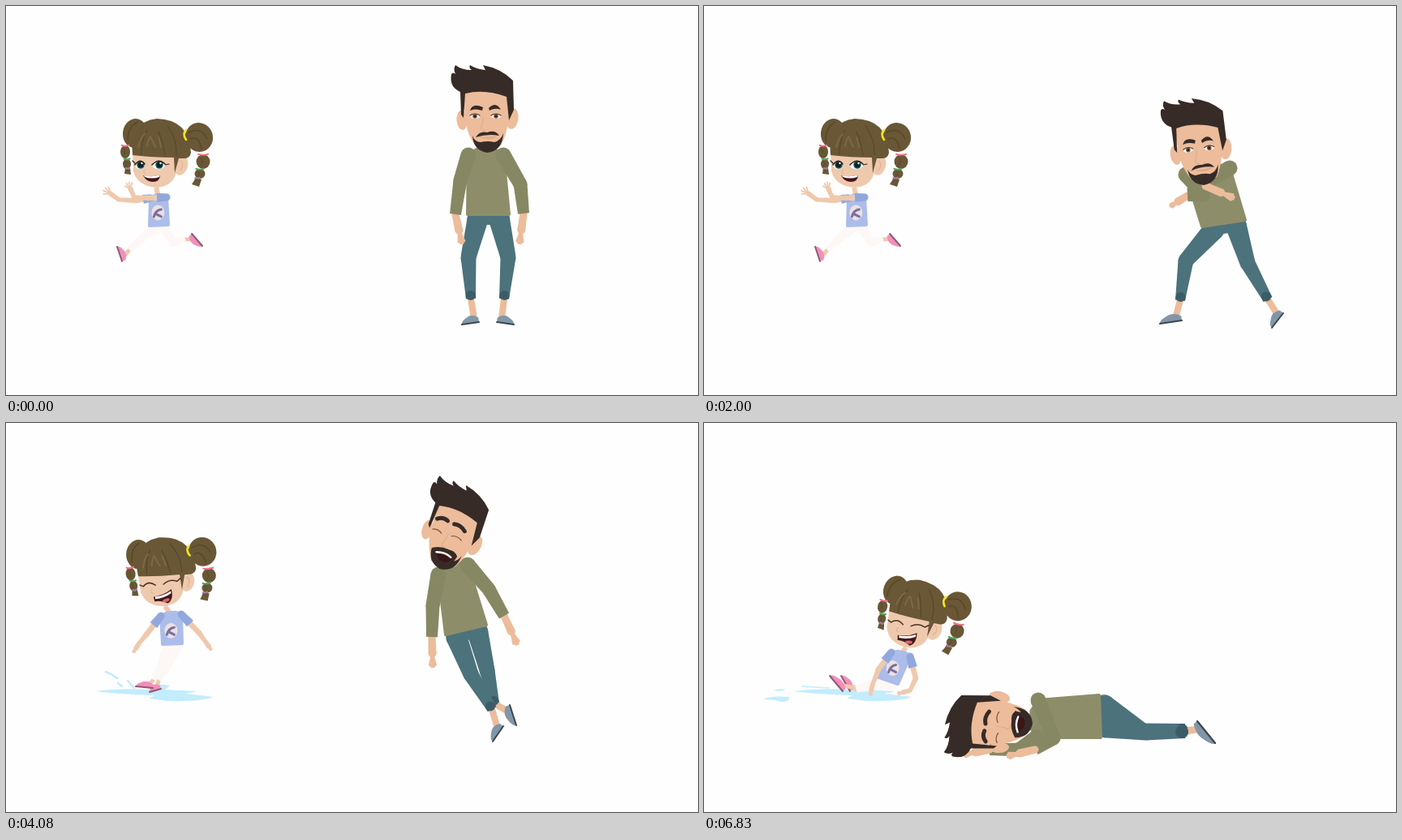
An HTML page with a canvas for the animation above (6.91 s loop, 853 px wide and 480 px high).

```html
<!DOCTYPE html>
<html lang="en">
<head>
<meta charset="utf-8">
<title>Run, dodge, slip</title>
<style>
html, body { margin: 0; width: 100%; height: 100%; overflow: hidden; background: #fefefe; }
canvas { display: block; }
</style>
</head>
<body>
<canvas id="stage" width="853" height="480"></canvas>
<script>
const ctx = document.getElementById('stage').getContext('2d');
const LOOP = 6910, STEP = 1000 / 12;

const MAN = { skin: '#ecbc9b', shade: '#dfa986', hair: '#372b27', shirt: '#8d8e69', sleeve: '#868863',
  pants: '#4c727c', cuff: '#3c5d67', shoe: '#8197a8', sole: '#3c4650' };
const GIRL = { skin: '#efc9ad', shade: '#dcae8f', hair: '#695735', dark: '#54452a', light: '#7b6943',
  shirt: '#acbdea', sleeve: '#92a8dc', pants: '#fdf8f6', shoe: '#f38fba', sole: '#8d5a73' };

// Drawing helpers
const fill = (color, d) => { ctx.fillStyle = color; ctx.fill(new Path2D(d)); };
function line(color, width, d) {
  ctx.strokeStyle = color;
  ctx.lineWidth = width;
  ctx.lineCap = ctx.lineJoin = 'round';
  ctx.stroke(new Path2D(d));
}
function oval(color, x, y, rx, ry = rx, turn = 0) {
  ctx.fillStyle = color;
  ctx.beginPath();
  ctx.ellipse(x, y, rx, ry, turn, 0, 7);
  ctx.fill();
}
function poly(color, points, round = 0) {
  const d = 'M' + points.map(p => p.join()).join('L') + 'Z';
  fill(color, d);
  if (round) line(color, round, d);
}
const between = (a, b, k) => a.map((v, i) => v + (b[i] - v) * k);
const shift = (p, dir, n) => [p[0] + dir[0] * n, p[1] + dir[1] * n];
const pairs = list => list.flatMap((v, i) => i % 2 ? [] : [[v, list[i + 1]]]);

function limb(color, points, widths) {
  points.slice(1).forEach((b, i) => {
    const a = points[i];
    const t = Math.atan2(b[1] - a[1], b[0] - a[0]) + Math.PI / 2;
    const n = [Math.cos(t) / 2, Math.sin(t) / 2];
    const [u, v] = [widths[i], widths[i + 1]];
    poly(color, [shift(a, n, u), shift(b, n, v), shift(b, n, -v), shift(a, n, -u)]);
    oval(color, a[0], a[1], u / 2);
  });
}
function hand(color, wrist, tip, width, spread) {
  const angle = Math.atan2(tip[1] - wrist[1], tip[0] - wrist[0]);
  const reach = Math.hypot(tip[0] - wrist[0], tip[1] - wrist[1]);
  const palm = between(wrist, tip, .55);
  limb(color, [wrist, palm], [width * .9, width]);
  oval(color, palm[0], palm[1], width / 2);
  for (let i = -1.5; i < 2; i++) {
    const a = angle + i * spread;
    const end = shift(palm, [Math.cos(a), Math.sin(a)], reach * (.47 - Math.abs(i) * .05));
    line(color, width * .3, `M${palm}L${end}`);
  }
}
function foot(look, ankle, heel, toe, height, skinWidth) {
  const dx = toe[0] - heel[0], dy = toe[1] - heel[1], size = Math.hypot(dx, dy);
  const side = Math.sign(dx * (ankle[1] - heel[1]) - dy * (ankle[0] - heel[0])) || -1;
  const up = [-dy / size * side, dx / size * side];
  limb(look.skin, [ankle, shift(between(heel, toe, .25), up, height / 2)], [skinWidth, skinWidth]);
  ctx.save();
  ctx.translate(...heel);
  ctx.rotate(Math.atan2(dy, dx));
  ctx.scale(size, height * side);
  fill(look.shoe, 'M0 0L0 .55Q.35 1.25 .72 .7Q1 .4 1 0Z');
  ctx.restore();
  line(look.sole, 2, `M${heel}L${toe}`);
}
function placeHead([x, y, degrees], chin, draw) {
  ctx.save();
  ctx.translate(x, y);
  ctx.rotate(degrees * Math.PI / 180);
  ctx.translate(-chin[0], -chin[1]);
  draw();
  ctx.restore();
}

// Body: shoulder L, shoulder R, hem R, hem L. Arm: elbow, wrist, fingertip.
// Leg: knee, ankle, heel, toe. Head: chin x, y, turn.
const man = {
  stand: { head: [593, 180, 0], body: [570, 184, 613, 184, 620, 257, 569, 257],
    armL: [560, 215, 554, 257, 562, 293], armR: [634, 220, 638, 256, 633, 293],
    legL: [570, 310, 573, 361, 583, 390, 562, 393], legR: [619, 310, 614, 361, 605, 390, 626, 393] },
  crouch: { head: [598, 198, 2], body: [570, 188, 610, 194, 602, 272, 563, 262],
    armL: [557, 225, 555, 264, 561, 300], armR: [626, 232, 626, 273, 622, 311],
    legL: [575, 312, 575, 363, 568, 389, 589, 396], legR: [610, 312, 605, 364, 598, 388, 625, 392] },
  wide: { head: [616, 220, -5.5], body: [594, 208, 648, 200, 667, 264, 614, 272],
    armL: [616, 233, 596, 234, 575, 247], armR: [604, 226, 618, 222, 653, 237],
    legL: [594, 314, 587, 363, 589, 388, 562, 392], legR: [670, 317, 695, 362, 714, 379, 700, 397] },
  step: { head: [608, 208, -4.5], body: [593, 203, 640, 194, 659, 265, 609, 278],
    armL: [583, 242, 599, 257, 561, 272], armR: [604, 236, 617, 239, 652, 242],
    legL: [592, 316, 585, 363, 589, 388, 562, 392], legR: [648, 318, 672, 362, 690, 374, 670, 385] },
  stagger: { head: [535, 179, 20], body: [533, 187, 569, 175, 592, 249, 542, 261],
    armL: [526, 225, 525, 264, 526, 301], armR: [595, 205, 614, 238, 630, 273],
    legL: [573, 310, 599, 353, 613, 374, 600, 393], legR: [593, 305, 602, 346, 621, 348, 629, 373] },
  lying: { head: [404, 371, -88], body: [410, 388, 412, 342, 487, 336, 489, 388],
    armL: [388, 403, 352, 403, 320, 409], armR: [431, 389, 408, 403, 374, 411],
    legL: [545, 382, 593, 381, 608, 368, 630, 395], legR: [541, 380, 593, 379, 608, 368, 630, 395] }
};
const manKeys = [
  [0, 'stand'], [480, 'wide'], [830, 'crouch'], [1250, 'stand'], [1580, 'stand'], [2000, 'wide'],
  [2330, 'wide'], [2830, 'step'], [3080, 'crouch'], [3750, 'stand'], [4080, 'stagger'],
  [4170, 'stagger'], [4500, 'lying'], [LOOP, 'lying']
];

const running = { head: [185, 224, 0], body: [178, 237, 198, 236, 200, 270, 177, 271],
  armL: [160, 240, 139, 239, 121, 226], armR: [174, 237, 158, 236, 150, 218], spread: [.42] };
const passA = [178, 294, 187, 306, 194, 315, 177, 316], passB = [198, 291, 205, 301, 207, 303, 199, 317];
const strides = [
  [[166, 288, 152, 301, 143, 315, 137, 297], [206, 292, 221, 288, 229, 281, 242, 296]],
  [passA, passB],
  [[207, 290, 214, 289, 221, 285, 231, 301], [172, 290, 157, 295, 147, 301, 142, 284]],
  [passB, passA]
];
const girl = {
  slip: { head: [196, 226, -6], body: [191, 238, 216, 236, 217, 272, 193, 273],
    armL: [173, 261, 164, 272, 157, 283], armR: [238, 259, 246, 270, 253, 280],
    legL: [192, 298, 182, 317, 181, 327, 160, 325], legR: [199, 300, 188, 317, 191, 328, 177, 332], spread: [.2] },
  sit: { head: [249, 277, 11], body: [231, 283, 254, 288, 239, 322, 213, 313],
    armL: [215, 304, 208, 322, 205, 336], armR: [261, 315, 254, 330, 239, 334],
    legL: [205, 322, 187, 327, 171, 331, 155, 312], legR: [210, 325, 188, 329, 180, 331, 169, 312], spread: [.2] }
};

function mix(a, b, k) {
  const pose = {};
  for (const part in a) pose[part] = between(a[part], b[part], k);
  return pose;
}
const smooth = k => k * k * (3 - 2 * k);

function drawFigure(look, pose, size) {
  const [shL, shR, hemR, hemL] = pairs(pose.body);
  const top = between(shL, shR, .5), base = between(hemL, hemR, .5);
  const length = Math.hypot(top[0] - base[0], top[1] - base[1]);
  const up = [(top[0] - base[0]) / length, (top[1] - base[1]) / length];
  const arms = [[shL, ...pairs(pose.armL)], [shR, ...pairs(pose.armR)]];

  [pose.legR, pose.legL].forEach((leg, i) => {
    const hip = shift(between(hemL, hemR, i ? .24 : .76), up, -6 * size.scale);
    const [knee, ankle, heel, toe] = pairs(leg);
    foot(look, ankle, heel, toe, size.shoe, size.ankle);
    limb(look.pants, [hip, knee, ankle], size.leg);
    if (look.cuff) limb(look.cuff, [between(knee, ankle, .92), ankle], [size.leg[2], size.leg[2]]);
  });
  poly(look.pants, [hemL, hemR, shift(between(hemL, hemR, .85), up, -13 * size.scale),
    shift(between(hemL, hemR, .15), up, -13 * size.scale)]);

  limb(look.skin, [top, pose.head], [size.neck, size.neck]);
  if (!size.shortSleeve) arms.forEach(([, , wrist, tip]) => hand(look.skin, wrist, tip, 10, .16));
  poly(look.shirt, [shL, shift(between(shL, shR, .28), up, size.collar),
    shift(between(shL, shR, .72), up, size.collar), shR, hemR, hemL], 4);
  if (size.shortSleeve) {
    const mark = between(between(top, base, .5), hemL, .08);
    oval('#eddfe3', ...mark, 8, 9.5);
    line('#77719d', 3, `M${mark[0] - 5},${mark[1] + 5}q2-8 9-9m-6 6l6 3`);
  }
  arms.forEach(([shoulder, elbow, wrist, tip]) => {
    if (size.shortSleeve) {
      hand(look.skin, wrist, tip, 6, pose.spread[0]);
      limb(look.skin, [shoulder, elbow, wrist], [7, 6.5, 5]);
      limb(look.sleeve, [shoulder, between(shoulder, elbow, .5)], [9, 11]);
    } else {
      limb(look.sleeve, [shoulder, elbow, wrist], [19, 17, 14]);
      if (Math.abs(tip[0] - wrist[0]) > 25) hand(look.skin, wrist, tip, 10, .16);
    }
  });
}

function manHead(hurt) {
  const { skin, shade, hair } = MAN;
  oval(skin, 562, 141, 6.5, 12, -.1);
  oval(skin, 624, 139, 7.5, 13, .15);
  fill(skin, 'M563 105L621 105L619 142Q617 160 610 172Q593 183 578 172Q570 160 567 146Z');
  fill(hair, 'M560 106Q546 100 549 84Q551 81 554 84Q551 78 554 73Q562 79 574 79Q570 76 572 73Q580 78 591 79L588 73Q610 77 625 92L626 128L620 141L617 112Q590 102 566 108L564 138L561 134Z');
  line(shade, 1, 'M588 137Q588 146 585 151Q586 154 590 154');
  fill(hair, 'M575 160Q576 178 593 181Q612 179 613 157Q610 166 602 168Q594 166 585 168Q578 168 575 160Z');
  fill(hair, 'M579 162Q584 154 593 156Q603 152 608 160Q594 157 579 162Z');
  if (hurt) {
    line(hair, 5, 'M569 124Q575 119 582 122M591 123Q599 121 606 127');
    line('#795241', 1.2, 'M568 138Q574 135 580 139M593 138Q600 135 606 139');
    fill(hair, 'M575 160Q590 150 608 159L604 176L580 175Z');
    fill('#3b1517', 'M580 163Q590 158 603 162Q601 174 589 171Z');
    line('#fff', 2.4, 'M582 163Q592 159 601 163');
  } else {
    fill(hair, 'M572 129Q575 119 588 125L587 129Q578 126 572 129ZM595 126Q604 117 610 128Q603 125 596 129Z');
    for (const x of [578, 604]) {
      oval('#fff', x, 136, 6, 3);
      oval('#755039', x, 136, 2.8);
      oval('#201815', x, 136, 1.3);
      line('#49352d', 1.2, `M${x - 6},135q6-4 12 0`);
    }
    fill(shade, 'M583 161Q594 163 606 160Q596 168 583 161Z');
  }
}

function braid(spots) {
  const ties = ['#f0718d', '#4aa960', '#a07da8'];
  spots.forEach(([x, y, rx, ry], i) => {
    oval(GIRL.hair, x, y, rx, ry);
    line(GIRL.dark, .8, `M${x - rx / 3},${y - ry / 2}q${rx / 2},${ry / 2} 0,${ry}`);
    line(ties[i], 2.2, `M${x - rx * .7},${y - ry}q${rx * .7},1.5 ${rx * 1.4},0`);
  });
}
function girlHead(crying) {
  const { skin, shade, hair, dark, light } = GIRL;
  oval(hair, 159, 157, 15, 18, .15);
  line(dark, 1.2, 'M150 166Q150 149 162 143');
  fill(hair, 'M147 199L153 200L154 208L146 207Z');
  braid([[147, 180, 6, 8], [149, 195, 5, 6.5], [150, 202, 3, 2]]);
  oval(hair, 238, 162, 17, 18, -.3);
  line(dark, 1.2, 'M225 156Q240 148 248 164M227 164Q237 159 241 176');
  fill(hair, 'M234 212L241 214L238 223L229 220Z');
  braid([[243, 192, 8.5, 9], [239, 207, 6.5, 6], [236, 214, 3.5, 2]]);

  fill(skin, 'M156 180L157 204Q162 222 185 224Q204 223 209 208L225 184L206 164Z');
  oval(skin, 216, 197, 8, 12, .3);
  line(shade, 1, 'M215 191Q221 194 215 203');
  fill(hair, 'M156 184Q151 143 186 139Q226 140 228 181Q227 187 221 188L213 188L208 206L207 187Q180 187 156 184Z');
  line(dark, 1, 'M167 183Q167 164 174 153M196 184Q193 166 188 155M210 184Q211 163 199 148');
  line(light, 2, 'M163 174Q166 162 171 158M174 173Q175 165 178 161L184 174M191 174Q190 167 188 162');
  line('#f5e51f', 2.6, 'M222 153Q217 158 222 165');
  line(shade, 1, 'M171 202Q168 206 172 207');

  if (crying) {
    line('#4b3428', 1.5, 'M161 197Q168 190 176 197M186 197Q194 191 203 195M161 197l-4 -2M203 195l4 -3');
    fill('#451719', 'M172 211Q184 211 195 204Q197 217 189 221Q181 216 173 217Z');
    fill('#fff', 'M174 211Q185 211 194 206L194 209Q185 214 174 214Z');
    oval('#d9666b', 187, 217, 4.5, 2, -.2);
  } else {
    for (const [x, rx] of [[165, 6], [188, 8]]) {
      oval('#fff', x, 196, rx, 5.2);
      oval('#15686a', x + 1, 196, 4.8);
      oval('#10201f', x + 1, 196, 3.4);
      oval('#fff', x + 2.5, 194, 1.2);
      line('#2e241e', 1.6, `M${x - rx},196Q${x},187 ${x + rx},195`);
    }
    line('#2e241e', 1.2, 'M159 194l-3 -3M196 196l5 -1');
    fill('#451719', 'M169 209Q180 212 190 208Q190 217 181 217Q173 217 169 209Z');
    fill('#fff', 'M170 209Q180 212 190 208L189 211Q180 214 171 211Z');
  }
}

function drawWater(time) {
  const blue = '#c3ecfd';
  fill(blue, 'M110 331Q140 327 179 329L176 325Q189 321 202 324L196 329L236 331L222 334L256 338Q240 344 200 343L176 340L183 336Q140 335 110 331Z');
  if (time < 4250) line(blue, 2.6, 'M123 307Q131 310 137 315M138 321L143 325M150 318L158 327');
  else {
    fill(blue, 'M73 341Q82 336 105 338Q106 344 95 344L88 342ZM86 330Q92 327 101 329Q95 332 86 330Z');
    line(blue, 1.5, 'M121 325L154 327');
  }
}

function drawGirl(frame, time) {
  const size = { scale: .5, leg: [13, 10, 7], ankle: 5, shoe: 8, neck: 6, collar: 3, shortSleeve: true };
  const slipping = time >= 3830;
  let pose;
  if (slipping) {
    drawWater(time);
    const k = Math.min(1, Math.max(0, (time - 4160) / 340));
    pose = mix(girl.slip, girl.sit, k * k);
    if (time < 4160) pose.head[2] += 4 * Math.sin((frame - 49) * 1.6);
  } else {
    const [legL, legR] = strides[frame % 4];
    pose = { ...running, legL, legR };
    if (frame % 4 === 2)
      for (const [x, y, r] of [[241, 306, 7], [251, 305, 7], [252, 313, 7], [243, 314, 7], [246, 309, 8]])
        oval('#f1f1ef', x, y, r);
  }
  ctx.save();
  if (!slipping) ctx.translate(0, frame % 2 * 2);
  drawFigure(GIRL, pose, size);
  placeHead(pose.head, [185, 224], () => girlHead(slipping));
  ctx.restore();
}

function drawMan(time) {
  const next = Math.max(1, manKeys.findIndex(([at]) => at > time));
  const [start, from] = manKeys[next - 1], [end, to] = manKeys[next];
  const k = (time - start) / (end - start);
  const pose = mix(man[from], man[to], from === 'stagger' ? k * k : smooth(k));
  drawFigure(MAN, pose, { scale: 1, leg: [26, 19, 12 + (time > 4500 ? 4 : 0)], ankle: 8, shoe: 10, neck: 20, collar: 8 });
  placeHead(pose.head, [593, 180], () => manHead(time >= 3830));
}

function draw(now) {
  const frame = Math.floor((now % LOOP + 4) / STEP) % 83;
  const time = Math.round(frame * STEP / 10) * 10;
  ctx.fillStyle = '#fefefe';
  ctx.fillRect(0, 0, 853, 480);
  drawGirl(frame, time);
  drawMan(time);
}
const origin = performance.now();
function tick() {
  draw(performance.now() - origin);
  requestAnimationFrame(tick);
}
tick();
</script>
</body>
</html>
```
